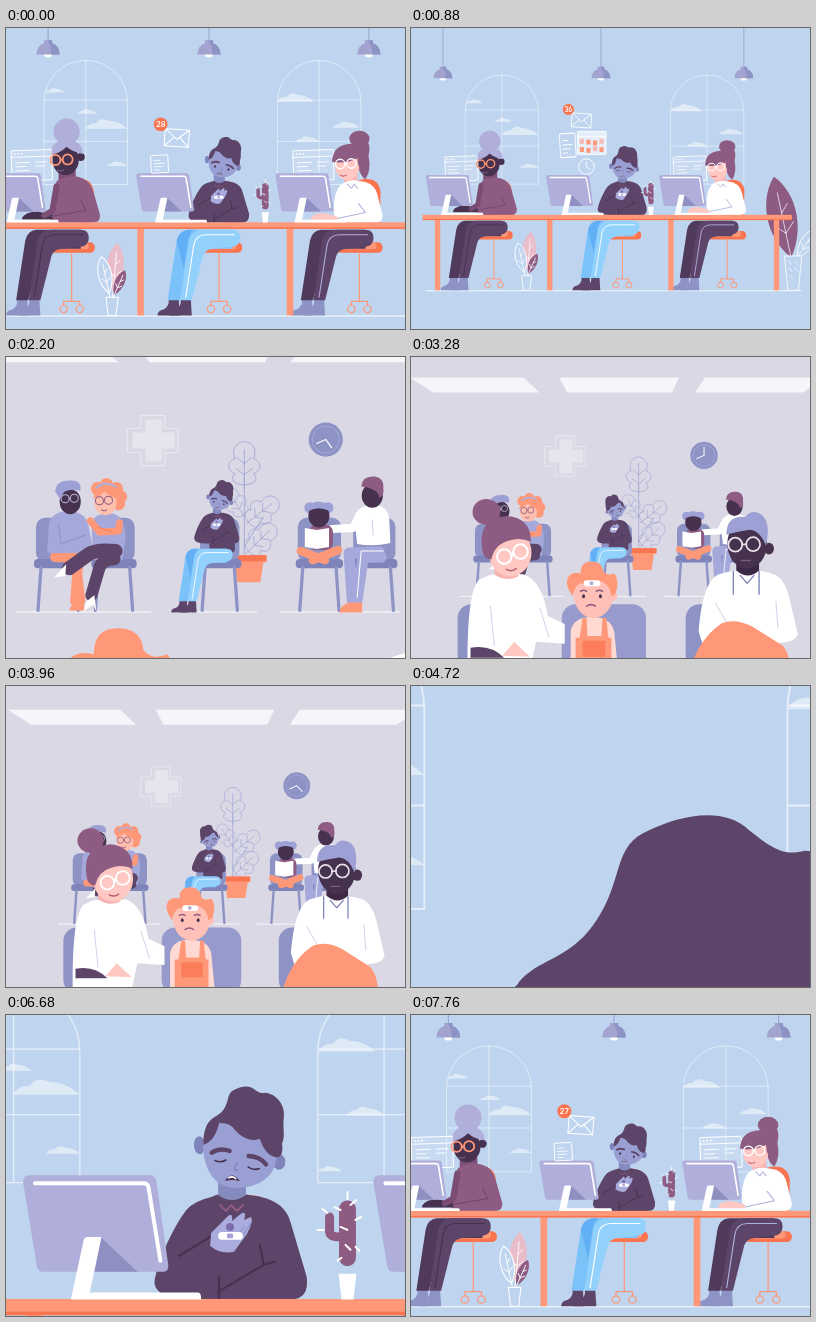
Write an HTML page that moves like this. It is 399 px wide and 301 px high and loops after 7.8 s.

```html
<!DOCTYPE html>
<html lang="en">
<head>
<meta charset="utf-8">
<title>Office and waiting room</title>
<style>
html, body { margin: 0; width: 100%; height: 100%; overflow: hidden; background: #bfd5ef; }
svg { display: block; width: 100vw; height: 100vh; }
text { font: 700 8px Lato, sans-serif; fill: #fff; text-anchor: middle; }
</style>
</head>
<body>
<svg id="stage" viewBox="0 0 399 301" preserveAspectRatio="none"></svg>
<script>
const SKY = '#bfd5ef', WALL = '#dad8e5', ORANGE = '#ff9878', DEEP = '#f9744f', DARK = '#5d4569',
  INK = '#46314f', LILAC = '#b0aeda', BLUE = '#8d93c5', MAUVE = '#8e5b82', PINK = '#ffc8c2',
  SKIN = '#9a9fd3', W = '#fff';

// Drawing helpers return SVG markup
const fill = (d, c, x = '') => `<path d="${d}" fill="${c}" ${x}/>`;
const line = (d, c, w = 1, x = '') =>
  `<path d="${d}" fill="none" stroke="${c}" stroke-width="${w}" stroke-linecap="round" stroke-linejoin="round" ${x}/>`;
const oval = (x, y, rx, ry, c, e = '') => `<ellipse cx="${x}" cy="${y}" rx="${rx}" ry="${ry}" fill="${c}" ${e}/>`;
const ring = (x, y, r, c, w = 1) => oval(x, y, r, r, 'none', `stroke="${c}" stroke-width="${w}"`);
const box = (x, y, w, h, c, r = 0, e = '') =>
  `<rect x="${x}" y="${y}" width="${w}" height="${h}" rx="${r}" fill="${c}" ${e}/>`;
const group = (attr, ...parts) => `<g ${attr}>${parts.join('')}</g>`;
const shift = (x, y, ...parts) => group(`transform="translate(${x} ${y})"`, ...parts);
const glasses = (x, y, r, gap, c, w = 1, rise = .5) =>
  ring(x, y, r, c, w) + ring(x + gap, y - rise, r, c, w) + line(`M${x + r} ${y}L${x + gap - r} ${y - rise}`, c, w);

// ---------- office ----------
const cloud = (x, y, w) => fill(`M${x} ${y}q${w * .1} ${-w * .15} ${w * .25} ${-w * .13}
  q${w * .12} ${-w * .16} ${w * .3} ${-w * .06}q${w * .25} 0 ${w * .45} ${w * .19}z`, W, 'opacity=".5"');
const pane = x => line(`M${x} 156V74.5a41.5 41.5 0 0 1 83 0V156zM${x + 41.5} 33V156M${x} 72.5h83M${x} 113.5h83`,
  W, .8, 'opacity=".6"');
const windows = pane(39) + pane(271) + cloud(40, 65, 20) + cloud(80, 101, 42) + cloud(72, 86, 20) + cloud(101, 138, 21) +
  cloud(271, 74, 36) + cloud(289, 114, 24) + cloud(271, 149, 15) + cloud(326, 100, 27);

const lamp = line('M0-80V-12', BLUE, .8) + oval(0, 0, 4, 3, W) +
  fill('M-11.5 0Q-11-9-4-11V-14H4V-11Q11-9 11.5 0z', '#a3a3d0') + fill('M0-14H4V-11Q11-9 11.5 0H3Q4-8 0-12z', BLUE);

const seat = dx => shift(dx, 0, box(190, 213.5, 46, 10.5, DEEP, 5), box(190, 213.5, 40, 7, ORANGE, 3.5),
  line('M213 224V272M205 276V272H221V276', ORANGE, 1.2), ring(205, 279.5, 3.6, ORANGE, 1.2), ring(221, 279.5, 3.6, ORANGE, 1.2));
const shoe = (x, c) => fill(`M${x + 6} 270l1 16H${x - 15}q0-5 6-6 6-3 5-10z`, c);
const legs = (dx, back, front, shoes, ankle, stripe) => shift(dx, 0,
  ankle ? line('M168 264V278M180 264V278', ankle, 6) : '', shoe(167, shoes), shoe(179, shoes),
  fill('M226 201H182Q173 202 171 212L162 271H174L185 226Q187 221 196 220H226z', back),
  fill('M226 201H197Q186 201 183 212L174.5 271H186L197 227Q199 221 207 220L226 218Q234 217 234 209T226 201z', front),
  line('M228 206H200Q190 206 188 216L180 268', stripe, 1.1));

const monitor = dx => shift(dx, 0, group('transform="scale(.392) translate(318 210)"',
  fill('M22 160H143Q149 160 150 166L162 251Q162 257 157 257H36Q31 257 30 252L16 167Q16 160 22 160z', LILAC),
  line('M28 168H137Q141 168 142 172L154 246', W, 4),
  fill('M94 222L131 257H88z', '#8f90c1'),
  fill('M80 222H94Q95 222 94 226L83 278H192Q195 278 195 285H64L77 225Q78 222 80 222z', W)));

const browser = (x, y) => shift(x, y, group('transform="rotate(-2)"',
  box(0, 0, 40, 30, W, 1, `fill-opacity=".12" stroke="${W}" stroke-width="1"`),
  line('M0 6.5H40M4 12H18M4 16H14M4 20H17M24 12H35M24 16H32', W, .9),
  line('M3.5 3.3h.1M7 3.3h.1M10.5 3.3h.1', W, 1.8)));

const guyHead = group('id="head"',
  oval(195, 126, 5.5, 9, '#7e83ba'), oval(274, 146, 6.5, 8, '#7e83ba'),
  fill('M200 116C195 142 204 167 226 170C252 173 273 160 272 136L262 98H212z', SKIN),
  line('M207 134Q215 129 225 133M244 139Q255 140 261 148', DARK, 4.5),
  group('id="shut"', line('M210 142q5 3 11 0M243 150q6 4 11 2', INK, 1.6)),
  group('id="open"', oval(215, 143, 2.4, 3.2, INK), oval(249, 151, 2.4, 3.2, INK)),
  line('M232 146q-5 6 0 7', '#7e83ba', 1.5),
  fill('M219 163Q227 152 234 164Q227 161 219 163z', INK), line('M223 160q4-2 7 1', W, 1.6),
  fill(`M199 126C199 116 202 106 206 102.5C210 97 217 98 222.4 88.6C227 81 225 75 232 72C238 69 247 67 252 72
    C257 76 259 77 263 76C274 77 283 89 281 101C279 113 282 120 278 128C279 138 276 143 270 141
    C262 138 258 130 256 122C246 126 235 118 229 109C224 104 220 106 216 104C213 113 210 122 199 126z`, DARK));
const guyTop = group('id="guyTop" transform="scale(.392) translate(318 210)"',
  fill('M205 182Q222 174 243 180C262 182 280 188 285 208L301 262Q304 285 284 285H192Q150 286 148 268C150 250 165 215 180 195Q188 186 205 182z', DARK),
  line('M173 241L204 222M254 230L258 250L212 277M258 250L269 247M213 262V284', INK, 2.2),
  fill('M212 158V180Q226 190 240 180V160z', '#858abf'),
  line('M214 190l6 6 5-6 6 6 6-6', MAUVE, 2),
  fill('M205 218L221 202Q227 196 226 206L236 198Q241 196 238 205L245 202Q248 206 241 219L228 237Q214 240 204 231z', '#a9acdd'),
  line('M238 212L231 222M245 208L236 222', '#868bc0', 1), oval(224, 212, 4, 4, '#7d6cab'),
  box(212, 217, 25, 8, W, 4), box(221, 218.5, 6, 5, '#a9a0d4', 1));
const guyLegs = legs(0, '#7cc2fa', '#93d1fd', DARK, '', W) + fill('M171 212Q173 203 182 201H188Q183 205 182 214L178 240z', '#62aff5');

const woman = group('class="nod"',
  fill('M54 142H71V156H54z', '#7d4f76'),
  oval(76, 129, 4, 4, INK), oval(61, 132, 13, 15, INK),
  oval(62, 104, 13, 13, LILAC), fill('M47 127Q46 112 62 112Q78 113 78 126Q67 124 62 119Q56 125 47 127z', LILAC),
  glasses(51, 132, 5, 12, ORANGE, 1.7), line('M53 142q3 2 6 0', '#8c6a90', 1)) +
  fill('M52 153Q62 146 75 149Q86 152 89 165L95 186Q96 194 88 194H46Z', MAUVE) +
  group('class="type"', fill('M18 189Q22 183 33 183L48 186V191H18z', INK), line('M52 158L48 182L40 187', '#7b4d74', 6)) +
  line('M76 172L81 182L46 188', '#72476d', 1);
const girl = fill('M351 110Q365 110 361 128Q364 142 358 151Q350 146 350 128z', MAUVE) +
  group('class="nod"', fill('M337 145H350V158H337z', '#f7b4b2'), oval(340, 138, 12, 14, PINK),
    oval(352, 111, 10, 8, MAUVE), fill('M325 134Q325 117 344 116Q361 118 359 147Q350 142 350 130Q340 136 325 134z', MAUVE),
    glasses(333, 136, 4.7, 11, W, 1.3), line('M333 147q3 2 6 0', '#b65c70', 1)) +
  fill('M333 157Q342 150 353 153Q367 154 370 167L375 187Q375 194 368 194H328Q324 168 333 157z', W) +
  line('M340 156l4 4 3-4 3 4M351 175L358 184L330 190', '#aeb0da', 1) +
  group('class="type"', fill('M304 189Q309 184 318 185L330 188V192H305z', PINK));

const spikes = [[322, 198, -5, -4], [318, 215, -6, 0], [342, 184, 0, -7], [335, 195, -6, -3], [350, 205, 6, -3],
  [335, 212, 7, 3], [345, 190, 6, -5], [340, 230, 5, 5], [350, 232, 4, 4], [336, 243, -4, 3]];
const cactus = group('transform="scale(.392) translate(318 210)"',
  line('M342 194V243', MAUVE, 17), line('M324 202V216Q324 222 334 222', MAUVE, 9),
  spikes.map(([x, y, a, b]) => line(`M${x} ${y}l${a} ${b}`, W, 2)).join(''),
  fill('M333 259H351L348 285H336z', W));
const leaf = (x, y, h, c, tilt, e = '') => group(`transform="translate(${x} ${y}) rotate(${tilt})"`,
  fill(`M0 0C${-h * .28} ${-h * .35} ${-h * .2} ${-h * .8} 0 ${-h}C${h * .2} ${-h * .8} ${h * .26} ${-h * .35} 0 0z`, c, e),
  line(`M0 6V${-h * .8}M0 ${-h * .3}l${h * .12} ${-h * .12}M0 ${-h * .3}l${-h * .12} ${-h * .12}M0 ${-h * .55}l${h * .09} ${-h * .1}`, W, .8));
const plants = leaf(108, 262, 48, '#e9bcc9', 5) + leaf(104, 264, 37, SKY, -12, `stroke="${W}"`) + leaf(109, 266, 27, MAUVE, 24) +
  fill('M101 268H113L111 286H103z', SKY, `stroke="${W}"`) +
  leaf(430, 246, 101, MAUVE, -12) + leaf(438, 246, 42, SKY, 32, `stroke="${W}"`) +
  fill('M422 244H443L439 286H426z', SKY, `stroke="${W}"`) +
  line('M427 250l3 4m4-4l3 4m-9 5l3 4m4-4l3 4m-9 5l3 4', W, .8);
const chairBack = (x, y) => fill(`M${x - 14} ${y}Q${x + 6} ${y - 5} ${x + 8} ${y + 12}L${x + 7} 194H${x - 8}z`, DEEP);

const calendar = box(169, 92, 35, 28, W, 1, 'fill-opacity=".6" stroke="#fff"') + line('M169 98H204', W, 1) +
  [0, 1, 2, 3, 4, 5, 6, 7].map(i => box(172 + i % 4 * 8, 101 + (i >> 2) * 9 + i % 3, 5, 6, i % 3 ? ORANGE : '#f7b9b4')).join('');
const icons = group('id="icons"',
  group('id="mail"', group('transform="rotate(4 171 112)"', box(159, 103, 24, 17, 'none', 1, `stroke="${W}"`), line('M159 103L171 113L183 103M159 120L168 111M183 120L174 111', W)),
    oval(155, 98, 6.8, 6.8, DEEP), '<text id="count" x="155" y="101"></text>'),
  group('id="note"', box(0, 0, 17, 17, 'none', 1, `stroke="${W}" stroke-width=".9"`), line('M3 5H9M3 8H13M3 11H11M3 14H8', W, .8)),
  group('id="plan"', calendar),
  group('id="wait"', ring(180, 135, 9.5, W, 1.1), line('M180 129V135L184 138', W)));

const guy = group('id="guy"', chairBack(225, 154), seat(0), group('id="guyLegs"', guyLegs), guyTop,
  group('id="guyHead" transform="scale(.392) translate(318 210)"', guyHead));
const office = chairBack(81, 152) + chairBack(365, 152) + seat(-146) + seat(139) +
  browser(7, 123) + browser(286, 123) + line('M-16 286.5H442', W, 1) + plants +
  legs(-150, '#4f3a5b', DARK, BLUE, DARK, INK) + legs(132, '#4f3a5b', DARK, BLUE, PINK, LILAC) + woman + guy + girl +
  [-5, 132, 280, 409].map(x => box(x, 198, 6.5, 88, ORANGE)).join('') +
  box(-20, 193.8, 451, 6.4, ORANGE) + box(-20, 198.8, 451, 1.4, DEEP) +
  [-147, 0, 138].map(monitor).join('') + cactus + icons;

// ---------- waiting room ----------
const chair = (x, w) => box(x, 161, w, 44, BLUE, 9) + box(x - 2, 202, w + 4, 9, '#7e84ba', 4) +
  line(`M${x + 5} 210L${x + 2} 253M${x + w - 5} 210L${x + w - 2} 253`, BLUE, 3.2);
const FERN = '#a3a7d3';
const stem = (x, y, r, s = 1) => group(`transform="translate(${x} ${y}) rotate(${r}) scale(${s})"`,
  line(`M0 0C-12 0-14-7-9-11C-18-14-17-24-9-26C-14-35-7-43 0-43C7-43 14-35 9-26C17-24 18-14 9-11C14-7 12 0 0 0z
    M0 4V-35M0-10l8-6M0-10l-8-6M0-21l7-6M0-21l-7-6`, FERN, .9));
const crossAt = (x, y, a, b) =>
  `M${x - a} ${y - b}H${x - b}V${y - a}H${x + b}V${y - b}H${x + a}V${y + b}H${x + b}V${y + a}H${x - b}V${y + b}H${x - a}z`;
const wall = fill(crossAt(148, 84, 21, 8), '#e6e5ee') + line(crossAt(147, 84, 25, 12), '#f0eff5', .8) +
  oval(319, 83, 17, 17, BLUE) + ring(319, 83, 13.5, '#a9addb', .8) + line('M319 83L310 87', W, 1.2) +
  group('id="hand"', line('M319 83V73', W, 1.2)) +
  line('M238 198V120M238 190Q250 170 257 160', FERN, .9) + stem(238, 128, 0) + stem(237, 158, -32, .7) + stem(242, 165, 52, .85) + stem(242, 194, 46, .85) +
  fill('M226 198H260V205H257L254 225H231L229 205H226z', ORANGE) + box(226, 198, 34, 6, DEEP);

const couple = chair(31, 44) + chair(88, 41) +
  line('M68 199H76Q73 204 72 216L70 244M50 200L70 200L75 243', ORANGE, 10) + fill('M64 253Q66 245 77 242L80 253z', ORANGE) +
  fill('M44 165Q49 154 65 154Q80 156 83 168L87 188L74 196H42z', '#a5a8da') + line('M53 167L56 187L80 178', BLUE, 1) +
  oval(65, 145, 10.5, 12.5, INK) + fill('M50 135Q51 124 64 124Q77 123 75 134Q66 132 59 135L55 142z', '#9da0d4') + glasses(60, 142, 4, 9, '#c3b6d6') +
  fill('M86 165Q91 155 108 157Q119 160 120 180L117 203H88z', '#a5a8da') +
  line('M114 166L113 174L94 175L85 164', ORANGE, 7) + line('M92 170L106 175', DEEP, .8) +
  line('M109 202Q95 202 93 214L86 238', DARK, 12) + line('M110 194Q90 192 82 198L64 211', DARK, 14) +
  fill('M89 238L91 254L88 247L78 254L81 244z', W) + fill('M61 207L49 220L60 219z', W) +
  [[92, 132], [101, 128], [111, 132], [115, 140], [113, 147]].map(([x, y]) => oval(x, y, 6.5, 6.5, ORANGE)).join('') +
  oval(100, 146, 11, 12.5, '#ffbfae') + fill('M88 142Q89 131 102 131Q112 132 111 142Q102 138 99 135Q95 139 88 142z', ORANGE) +
  line('M91 131Q100 124 110 130', LILAC, 2) + glasses(94, 144, 4, 9, MAUVE) + line('M96 153q3 2 5 0', MAUVE);
const family = chair(291, 43) + chair(346, 42) +
  line('M372 195L342 196L345 242M374 200H356L350 242', '#a5a8da', 11) + line('M376 194H354L350 240', W, 1) +
  fill('M332 255Q334 247 342 245H355V255z', ORANGE) +
  fill('M347 160Q352 147 368 148Q382 150 382 165L383 186Q366 190 350 187z', W) + line('M351 161L346 171L325 172', W, 8) + line('M365 163L366 178', '#c9cae6') +
  oval(365, 139, 10.5, 12, INK) + fill('M354 130Q355 119 367 120Q377 121 376 132Q377 139 372 141Q371 132 354 130z', MAUVE) +
  oval(303, 151, 5.5, 5.5, '#9da0d4') + oval(321, 151, 5.5, 5.5, '#9da0d4') +
  box(302, 168, 24, 25, MAUVE, 7) + oval(312, 159, 10.5, 11.5, INK) + fill('M302 154Q303 144 312 145Q322 145 322 154Q312 149 302 154z', '#9da0d4') +
  line('M294 194L318 203M331 193L306 203', ORANGE, 8.5) + fill('M298 171L310 173L322 171V190L310 192L298 190z', W);
const room = line('M12 254.5H145M165 254.5H250M274 254.5H392', W, 1) + couple + chair(194, 39) +
  group('transform="translate(52 42) scale(.745)"', box(203, 190, 34, 16, DARK, 5), '<use href="#guyLegs"/><use href="#guyTop"/>',
    group('id="turn"', '<use href="#guyHead"/>')) + family;

const lights = fill('M-2 20H112L128 35H22zM148 20H268L261 35H156zM294 20H415L392 35H284z', '#f6f5fa');
const front = box(45, 248, 72, 70, BLUE, 14) + box(150, 248, 85, 70, '#979acc', 14) + box(275, 248, 84, 70, BLUE, 14) +
  fill('M55 315Q54 238 66 224Q80 214 112 218Q130 224 136 260L153 268V288L124 286L118 315z', W) +
  line('M78 250L82 290M128 252L137 281', '#cfd0e8', 1) + fill('M90 300L102 286L118 301z', PINK) + fill('M58 292Q78 288 92 302H58z', DARK) +
  fill('M82 204H106V220Q94 226 82 218z', '#f7b4b2') + oval(98, 196, 21.5, 24, PINK) + oval(74, 155, 14, 13, MAUVE) +
  fill('M70 194Q64 161 95 159Q119 161 119 185Q108 180 96 184Q82 188 79 203Q71 203 70 194z', MAUVE) +
  glasses(92, 200, 7.3, 16.5, W, 2, 5) + line('M94 213q6 3 10-1', '#b65c70', 1.5) +
  fill('M159 318V275Q162 261 180 261Q200 261 203 276L207 318z', '#ffd9d2') +
  fill('M164 318V282H168L171 262H175L176 280H190L191 262H195L197 282H200V318z', ORANGE) + box(171, 285, 23, 16, DEEP, 2, 'opacity=".75"') +
  oval(182, 238, 20, 24, '#ffc1b7') + oval(202, 240, 4, 5, '#ffc1b7') +
  fill('M161 240Q152 227 157 220Q161 215 169 217Q169 205 180 205Q191 205 192 215Q196 220 203 217Q209 224 204 238L200 240Q199 229 190 225Q180 230 168 227Q162 232 161 240z', ORANGE) +
  box(172, 224, 17, 6, W, 3) + oval(180, 227, 2, 2, LILAC) + line('M169 235q3-2 6 0M185 235q3-2 6 0M175 250q5-3 9 0', MAUVE, 1.6) +
  oval(172, 240, 1.5, 2, INK) + oval(189, 240, 1.5, 2, INK) +
  fill('M288 275Q292 225 308 218Q334 209 362 217Q376 221 381 248L388 278Q386 286 370 287L350 315H300z', W) +
  line('M323 215V238M349 215V238M330 219L337 227L344 219', '#777db8', 1.3) + line('M305 247L316 266M366 245L368 272', '#cfd0e8') +
  fill('M326 195H349V214Q338 224 326 214z', '#3d2946') + oval(337, 187, 20, 25, INK) + oval(359, 192, 5, 6, INK) +
  fill('M316 178Q316 158 335 160Q342 151 352 158Q361 166 356 189Q350 174 340 173Q326 175 316 178z', '#9da0d4') +
  glasses(325, 188, 7, 18, '#e8dfe9', 1.8) + line('M331 204h9', '#7c5c82', 1.5) +
  fill('M278 318Q288 282 312 267Q326 262 343 271L373 290Q381 300 381 318z', ORANGE);

const stage = document.getElementById('stage');
stage.innerHTML = box(0, 0, 399, 301, SKY) + group('id="panes"', windows) +
  [0, 1, 2].map(() => group('class="lamp"', lamp)).join('') + group('id="office"', office) +
  group('id="clinic"', box(0, 0, 399, 301, WALL), group('id="lights"', lights), group('id="wall"', wall),
    group('id="room"', room), group('id="front"', front));

// ---------- motion ----------
const LOOP = 7800, all = c => [...stage.querySelectorAll('.' + c)];
const parts = Object.fromEntries([...stage.querySelectorAll('[id]')].map(el => [el.id, el]));
const lamps = all('lamp'), nods = all('nod'), hands = all('type');
const ease = (a, b, t) => (1 - Math.cos(Math.PI * Math.min(1, Math.max(0, (t - a) / (b - a))))) / 2;
const move = (el, v) => el.setAttribute('transform', v);
const fade = (el, v) => el.setAttribute('opacity', v);
const look = (el, s, x, y) => move(el, `translate(200 150) scale(${s}) translate(${-x} ${-y})`);
const mix = (table, u) => {
  let i = 1;
  while (i < table.length - 1 && u > table[i][0]) i++;
  const a = table[i - 1], b = table[i], k = (u - a[0]) / (b[0] - a[0]);
  return a.slice(1).map((v, j) => v + (b[j + 1] - v) * k);
};
// camera distance, then desk centre, window distance and window centre
const CAMERA = [
  [.017, 213, 105.2, .37, 198, 124], [.077, 212.7, 110.9, .41, 198.6, 126],
  [.392, 203, 141, .625, 201, 145], [1, 200, 150, 1, 200, 150], [1.22, 210, 148.8, 1.13, 203.8, 149.5]];
// camera distance, lamp height and three lamp positions
const LAMPS = [[.37, -80, -82, 203, 487], [.97, 23, 38, 203, 367], [1, 28, 44, 203, 361], [1.22, 50, 32, 190, 333]];

function draw(t) {
  const late = t < 2600 ? t + LOOP : t;
  const u = .017 + .36 * ease(4360, 5700, late) + .843 * ease(6500, 8500, late) + .015 * ease(8500, 9440, late);
  const [x, y, far, wx, wy] = mix(CAMERA, u), [ly, ...lx] = mix(LAMPS, u);
  look(parts.office, 1 / u, x, y);
  look(parts.panes, 1 / far, wx, wy);
  lamps.forEach((el, i) => move(el, `translate(${lx[i]} ${ly}) scale(${1 / u})`));

  const rise = ease(7700, 8500, late);
  fade(parts.icons, ease(7000, 7400, late));
  move(parts.mail, `translate(${3 * rise} ${-33 * rise})`);
  move(parts.note, `translate(${145 + 2 * rise} ${129 - 34 * rise}) rotate(-3) scale(${1 + .12 * rise} ${1 + .7 * rise})`);
  fade(parts.plan, ease(8000, 8400, late));
  fade(parts.wait, ease(8200, 8550, late));
  parts.count.textContent = Math.floor(28 + (late - LOOP) / 110);

  const p = -.4 + 1.5 * ease(1500, 3600, t) + .04 * ease(3500, 4200, t);
  fade(parts.clinic, ease(1640, 1960, t) * (1 - ease(4040, 4280, t)));
  look(parts.room, 1 / (1 + .282 * p), 200 + 6 * p, 150 - 10.3 * p);
  look(parts.wall, 1 / (1 + .235 * p), 200 + 3.7 * p, 150 - 3 * p);
  look(parts.front, 1 / (.476 + .524 * p), 220.5 - 20.5 * p, 148.8 + 1.2 * p);
  move(parts.lights, `translate(${200 + 8 * (p - 1)} ${29 * (p - 1)}) scale(${1.1 - .1 * p} 1) translate(-200 0)`);
  move(parts.hand, `rotate(${(t - 3280) * .2} 319 83)`);
  move(parts.turn, t > 2700 ? 'translate(432 0) scale(-1 1)' : '');

  // the man rolls back from the desk and bends as he coughs
  const wave = n => Math.sin(2 * Math.PI * n * t / LOOP);
  const back = ease(7800, 8600, late), bend = back * (1 - ease(1600, 2000, t));
  const cough = [[700, 1500], [2400, 3000], [6300, 7000]].some(([a, b]) => t > a && t < b);
  const jolt = cough ? 2.5 * Math.abs(wave(12)) : 0;
  move(parts.guy, `translate(${11 * back} 0)`);
  move(parts.head, `translate(0 ${jolt}) rotate(${-jolt - 6 * bend} 228 168)`);
  fade(parts.shut, cough ? 1 : 0);
  fade(parts.open, cough ? 0 : 1);
  nods.forEach((el, i) => move(el, `translate(0 ${.5 * wave(5 + i)})`));
  hands.forEach((el, i) => move(el, `translate(${.7 * wave(16 + i)} ${.5 * wave(24)})`));
}

function tick() {
  draw(performance.now() % LOOP);
  requestAnimationFrame(tick);
}
tick();
</script>
</body>
</html>
```
